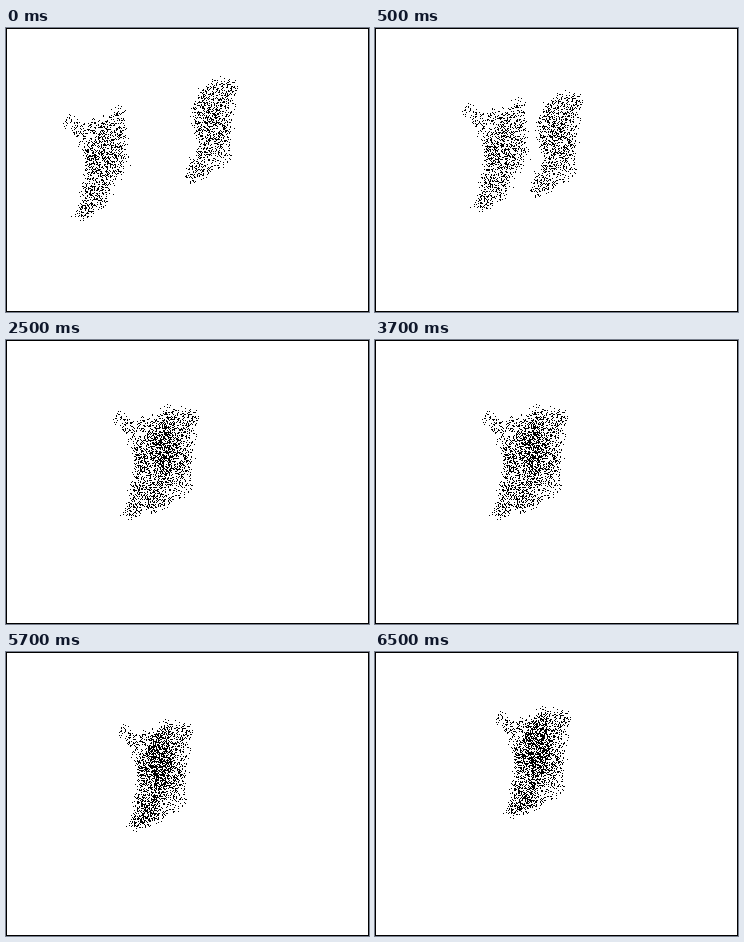
Recreate the animation shown at these times as an HTML page with a canvas. Size 363 px wide and 284 px high, loop 8000 ms.

```html
<!DOCTYPE html>
<html lang="en">
<head>
<meta charset="utf-8">
<title>Point cloud registration</title>
<style>
html, body { margin: 0; width: 100%; height: 100%; overflow: hidden; background: #fff; }
canvas { display: block; }
</style>
</head>
<body>
<canvas id="stage" width="363" height="284"></canvas>
<script>
const ctx = document.getElementById('stage').getContext('2d');
const W = 363, H = 284, LOOP = 8000;
const starts = [0, 500, 2500, 4500, 6500];

let seed = 20117;
function rand() {
  seed = (seed * 1664525 + 1013904223) % 4294967296;
  return seed / 4294967296;
}
function gauss() {
  return Math.sqrt(-2 * Math.log(1 - rand())) * Math.cos(2 * Math.PI * rand());
}

// Fills an outline with soft-edged random dots, denser around a core.
function makeCloud(outline, core, count) {
  const path = new Path2D('M' + outline + 'Z');
  const [cx, cy, sx, sy, share] = core;
  const dots = [];
  while (dots.length < count) {
    const inCore = rand() < share;
    const x = inCore ? cx + sx * gauss() : 50 + 190 * rand();
    const y = inCore ? cy + sy * gauss() : 45 + 155 * rand();
    if (ctx.isPointInPath(path, x, y)) {
      dots.push([x + 2.1 * gauss(), y + 2.1 * gauss()]);
    }
  }
  return dots;
}

const moving = makeCloud(
  '57 92 62 86 75 95 100 90 106 88 110 77 117 83 119 105 119 138 105 156 98 177 78 193 71 189 74 166 80 146 78 125 70 108',
  [95, 128, 11, 19, 0.03], 1400);
const fixed = makeCloud(
  '200 57 213 50 229 54 230 66 224 79 223 110 223 132 207 143 184 155 177 147 187 129 193 115 186 100 187 75',
  [206, 90, 9, 18, 0.03], 1200);

// Left tip, right tip and foot of the deforming cloud at each step.
const landmarks = [
  [[53, 92], [111, 73], [75, 198]],
  [[83, 80], [142, 65], [105, 189]],
  [[103, 76], [160, 60], [123, 185]],
  [[109, 77], [158, 63], [128, 184]],
  [[117, 64], [166, 50], [136, 171]]
];
const shifts = [[0, 0], [-24, 14], [-39, 18], [-45, 20], [-36, 7]];

// Maps a point by the affine motion carrying one triangle onto another.
function warp([x, y], [a, b, c], [d, e, f]) {
  const bx = b[0] - a[0], by = b[1] - a[1];
  const cx = c[0] - a[0], cy = c[1] - a[1];
  const px = x - a[0], py = y - a[1];
  const det = bx * cy - by * cx;
  const u = (px * cy - py * cx) / det;
  const v = (bx * py - by * px) / det;
  return [0, 1].map(i => d[i] + u * (e[i] - d[i]) + v * (f[i] - d[i]));
}

function dot([x, y]) {
  ctx.fillRect(Math.round(x), Math.round(y), 1, 1);
}

function draw(step) {
  ctx.fillStyle = '#fff';
  ctx.fillRect(0, 0, W, H);
  ctx.fillStyle = '#000';
  const [dx, dy] = shifts[step];
  for (const p of moving) dot(warp(p, landmarks[0], landmarks[step]));
  for (const [x, y] of fixed) dot([x + dx, y + dy]);
  ctx.strokeStyle = '#000';
  ctx.strokeRect(0.5, 0.5, W - 1, H - 1);
}

let shown = -1;
const begin = performance.now();
function tick() {
  const t = (performance.now() - begin) % LOOP;
  const step = starts.filter(s => s <= t).length - 1;
  if (step !== shown) draw(shown = step);
  requestAnimationFrame(tick);
}
tick();
</script>
</body>
</html>
```
